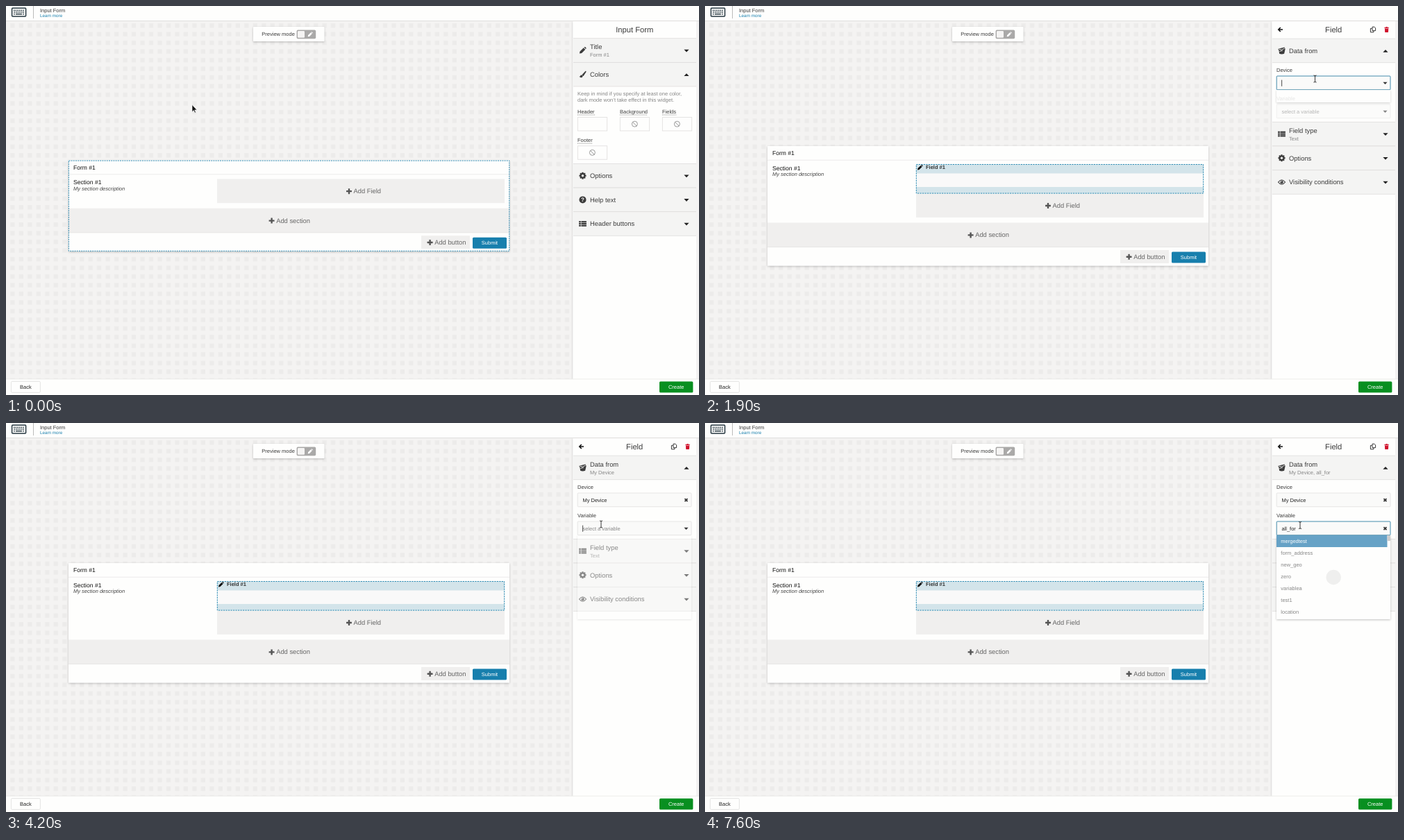
Animation of 998 by 561 pixels, one loop 8 s. Source, as an HTML page:

```html
<!DOCTYPE html>
<html lang="en">
<head>
<meta charset="utf-8">
<title>Form builder</title>
<style>
  html, body { margin: 0; width: 100%; height: 100%; overflow: hidden; background: #fefefd; }
  svg { display: block; width: 100vw; height: 100vh; }
  text { font-family: "Liberation Sans", Arial, sans-serif; text-rendering: geometricPrecision; white-space: pre; }
</style>
</head>
<body>
<svg id="stage" viewBox="0 0 998 561"></svg>
<script>
const INK = '#3c3c3c', GREY = '#868686', LINE = '#dedddc', BLUE = '#177fad', WHITE = '#fefefd', PALE = '#f0efee';

const text = (x, y, s, size = 7.5, fill = INK, extra = '') =>
  `<text x="${x}" y="${y}" font-size="${size}" fill="${fill}" ${extra}>${s}</text>`;
const rect = (x, y, w, h, fill, extra = '') =>
  `<rect x="${x}" y="${y}" width="${w}" height="${h}" fill="${fill}" ${extra}/>`;
const path = (d, fill, extra = '') => `<path d="${d}" fill="${fill}" ${extra}/>`;
const stroke = (d, color, w = 1, extra = '') =>
  path(d, 'none', `stroke="${color}" stroke-width="${w}" ${extra}`);
const group = (id, body, extra = '') => `<g id="${id}" ${extra}>${body}</g>`;
const put = (x, y, body, k = 1) => `<g transform="translate(${x} ${y}) scale(${k})">${body}</g>`;
const hline = (x, y, w, color = LINE) => rect(x, y - .4, w, .8, color);
const MID = 'text-anchor="middle"';

// Icons, each drawn around its own centre
const icon = {
  plus: c => rect(-4, -1.2, 8, 2.4, c, 'rx=".4"') + rect(-1.2, -4, 2.4, 8, c, 'rx=".4"'),
  pencil: c => path('M-4.6 4.6L-4 1.4L1.3-3.8L3.8-1.3L-1.4 4Z M2-4.4L2.7-5Q3.3-5.3 3.9-4.8L4.9-3.8Q5.3-3.2 4.9-2.6L4.3-2Z', c),
  brush: c => path('M-.9 .3L3.8-4.8Q5.2-5.3 5-3.8L1.3 2Q.7 2.6 0 2.1Z', c) + path('M-5 3Q-3.6 3-3.3 1.8Q-2.6.4-1.2.9Q.4 1.7 0 3Q-1.6 6-5 3Z', c),
  gear: c => [0, 45, 90, 135].map(a => rect(-1.2, -5, 2.4, 10, c, `rx=".5" transform="rotate(${a})"`)).join('') +
    `<circle r="2.8" fill="none" stroke="${c}" stroke-width="2"/><circle r="1.7" fill="#f4f4f3"/>`,
  help: c => `<circle r="5" fill="${c}"/>` + text(0, 2.9, '?', 8, '#fff', `font-weight="700" ${MID}`),
  list: c => [-3.9, -1.1, 1.7].map(y => rect(-5.4, y, 2.7, 2.2, c) + rect(-2, y, 7.4, 2.2, c)).join(''),
  data: c => path('M-4.8-2.6L4-4.8Q5.6-3 4.6 0L3.6 4.4Q0 5.8-3.4 4.4L-4-.4Q-5.6-1-4.8-2.6Z', c) +
    stroke('M-4-2.1Q0 .2 4.2-3.4M-3 1L1.4-.2', '#f4f4f3', .9),
  eye: c => stroke('M-5 0Q0-6.6 5 0Q0 6.6-5 0Z', c, 1.1) + `<circle r="2.2" fill="${c}"/><circle cx="-.7" cy="-.8" r=".7" fill="#fff"/>`,
  ban: c => `<circle r="4" fill="none" stroke="${c}"/>` + stroke('M-2.8-2.8L2.8 2.8', c),
  copy: c => stroke('M-1-3.8H2L3.6-2.2V1.6H-1ZM-1.4-1.6H-3.6V3.8H.9V2', c, .9),
  trash: c => rect(-3.2, -3.2, 6.4, 1.1, c) + rect(-1.2, -4, 2.4, 1, c) + path('M-2.7-1.6H2.7L2.3 4H-2.3Z', c),
  back: c => stroke('M3.4 0H-2.4M.2-3L-2.8 0L.2 3', c, 1.6),
  cross: c => stroke('M-2-2L2 2M2-2L-2 2', c, 1.7),
  down: c => path('M-3.6-1.7H3.6L0 2.1Z', c),
  up: c => path('M-3.6 1.9H3.6L0-1.9Z', c),
  keyboard: c => rect(-10, -6, 20, 12, 'none', `rx="1" stroke="${c}" stroke-width="1.5"`) +
    [-3.4, -.9].map((y, r) => [0, 1, 2, 3, 4, 5].map(i => rect(-7.6 + i * 2.6 + r * .4, y, 1.6, 1.5, c)).join('')).join('') +
    rect(-7.4, 1.9, 1.6, 1.5, c) + rect(-4.6, 1.9, 9, 1.5, c) + rect(5.6, 1.9, 1.6, 1.5, c),
};
const draw = (name, x, y, color = INK, k = 1) => put(x, y, icon[name](color), k);

function panelHead(cy, name, title, sub = '', open = false, id = '') {
  const y = sub ? cy - 1.6 : cy + 3.4;
  return rect(817, cy - 17.3, 177, 34.6, '#f4f4f3') + hline(817, cy - 17.3, 177) + hline(817, cy + 17.3, 177) +
    draw(name, 830.5, cy) + text(841, y, title, 9.4, INK, id && `id="${id}"`) +
    (sub && text(841, cy + 9.4, sub, 7.5, GREY)) + draw(open ? 'up' : 'down', 980, cy + .4, '#222');
}

const swatch = (x, y, label, w, empty) =>
  text(x, y, label) + stroke(`M${x} ${y + 2}H${x + w}`, '#555', .7, 'stroke-dasharray="1 1"') +
  rect(x + .3, y + 5.6, 42.4, 19.4, WHITE, `stroke="${LINE}" stroke-width=".8"`) +
  (empty ? '' : draw('ban', x + 21.4, y + 15.2, '#999'));

const addBox = (x, y, w, h, label, plusX, id = '') =>
  rect(x, y, w, h, PALE, id && `id="${id}"`) + draw('plus', plusX, y + h / 2 + .3, '#555') +
  text(plusX + 6.6, y + h / 2 + 3.2, label, 9.35, '#666');

function form(top, extra, selected) {
  const low = top + extra;
  return rect(90, top, 635, 131 + extra, WHITE, 'filter="url(#soft)"') +
    text(97, top + 13.2, 'Form #1', 8.55, '#111') + hline(90, top + 20.2, 635, '#e8e7e6') +
    text(97, top + 34.6, 'Section #1', 8.55, '#111') +
    text(97, top + 43.2, 'My section description', 7.5, '#444', 'font-style="italic"') +
    addBox(304, low + 26.8, 414, 34.7, 'Add Field', 494, selected ? 'addField' : '') +
    addBox(90, low + 69, 635, 35.2, 'Add section', 382.6) + hline(90, low + 104.2, 635, '#e4e3e2') +
    addBox(598, low + 108.5, 70, 19, 'Add button', 610.6) +
    rect(672, low + 111, 49, 16, BLUE, 'rx="1.5"') +
    text(696.5, low + 121.7, 'Submit', 7.5, '#fff', MID) +
    (selected ? rect(90.4, top + .4, 634.4, 130.2, 'none', `stroke="${BLUE}" stroke-width=".9" stroke-dasharray="2 1.2"`) : '');
}

const field = rect(304, 228.4, 414, 41.8, '#d3e4ea', 'id="field"') + rect(304.5, 241.4, 413, 19.6, '#f9f9f9') +
  rect(304.3, 228.5, 413.4, 41.6, 'none', `stroke="${BLUE}" stroke-width=".9" stroke-dasharray="2.2 1.3"`) +
  draw('pencil', 309.6, 233, '#111', .78) + text(318, 235.4, 'Field #1', 7.5, '#333', 'font-weight="700"');

const input = (id, y) => rect(823.2, y, 163.8, 19.8, '#fafaf9', `id="${id}Box" rx="1" stroke-width=".9"`) +
  text(830.4, y + 12.6, '', 7.5, '#222', `id="${id}Text"`) +
  group(id + 'Open', draw('down', 979.5, y + 10.2, '#333', .85)) + group(id + 'Clear', draw('cross', 979.5, y + 10.2, '#333')) +
  rect(830.3, y + 5.6, .8, 9.2, '#222', `id="${id}Caret"`);

const listBox = (y, h) => rect(823, y, 164, h, WHITE, 'filter="url(#soft)"');
const rows = (id, y, names, thumb) => group(id,
  rect(823, y, thumb ? 159.5 : 164, 17, '#1874ab') +
  names.map((n, i) => text(829.3, y + 11.1 + i * 17, n, 7.5, i ? '#4a4a4a' : '#fff')).join('') +
  (thumb ? rect(982.5, y, 4.5, thumb, '#b4b4b4') : ''));

const devices = ['2drones', 'Benchmarking Device', 'Big truck', 'KQT Lantern 2', 'KQT Pebble Pro', 'KQT Brisk', 'drones'];
const variables = ['mergedtest', 'form_address', 'new_geo', 'zero', 'variablea', 'test1', 'location'];

const startPanel = text(905.2, 37.7, 'Input Form', 11.2, INK, MID) +
  panelHead(64, 'pencil', 'Title', 'Form #1') + panelHead(98.7, 'brush', 'Colors', '', true) +
  text(823, 129.4, 'Keep in mind if you specify at least one color,', 7.5, GREY) +
  text(823, 137.6, 'dark mode won’t take effect in this widget.', 7.5, GREY) +
  swatch(823, 155, 'Header', 25, true) + swatch(884, 155, 'Background', 40) +
  swatch(945, 155, 'Fields', 20.5) + swatch(823, 196.2, 'Footer', 22) +
  panelHead(244.7, 'gear', 'Options') + panelHead(279.4, 'help', 'Help text') + panelHead(314, 'list', 'Header buttons');

const fieldPanel = text(905.2, 37.7, 'Field', 11.2, INK, MID) +
  draw('back', 828.6, 34, '#111') + draw('copy', 962, 34, '#222') + draw('trash', 981.6, 34, '#d0112b') +
  panelHead(64.4, 'data', 'Data from', '', true, 'dataTitle') + text(841, 73.6, '', 7.5, GREY, 'id="dataSub"') +
  text(823, 94.6, 'Device') + input('device', 101) +
  group('variableGroup', text(823, 135.8, 'Variable') + input('variable', 142)) +
  panelHead(184.6, 'list', 'Field type', 'Text') + panelHead(219.3, 'gear', 'Options') +
  panelHead(254, 'eye', 'Visibility conditions') +
  group('shortList', listBox(121, 18)) + rows('match', 121, ['My Device']) +
  group('deviceList', listBox(121, 120)) + rows('deviceRows', 121, devices, 51) +
  group('variableList', listBox(162, 121)) + rows('variableRows', 162, variables, 8) +
  '<circle id="spinner" cx="905.2" fill="#999"/>';

const cursors =
  group('arrow', path('M0 0V10.2L2.3 8L3.9 11.6L5.4 10.9L3.8 7.4H7Z', '#111', 'stroke="#fff" stroke-width=".6"')) +
  group('hand', path('M0 .5Q1-.6 1.9.6V4L6 5Q7 5.4 6.8 6.6L6.2 9V11H1V9.6L-2 6.4Q-2.4 5-.9 5.4L0 6.2Z', '#fff', 'stroke="#222" stroke-width=".9"')) +
  group('beam', stroke('M-2-5Q0-5 0-4Q0-5 2-5M0-4.4V4.4M-2 5Q0 5 0 4Q0 5 2 5', '#222', .9));

document.getElementById('stage').innerHTML = `<defs>
  <filter id="soft" x="-10%" y="-15%" width="120%" height="130%"><feDropShadow dx="0" dy="1" stdDeviation="1.6" flood-opacity=".24"/></filter>
  <pattern id="grid" width="12.48" height="12.48" y="22" patternUnits="userSpaceOnUse">
    ${rect(0, 0, 12.48, 12.48, '#f4f3f2')}${rect(6.24, 3.1, 6.24, 6.24, '#ecebea')}</pattern></defs>` +
  rect(0, 0, 998, 561, 'url(#grid)') +
  rect(356, 30, 102.3, 21, WHITE, 'rx="1" filter="url(#soft)"') + text(368.3, 43.3, 'Preview mode') +
  rect(418.6, 34.6, 27.6, 12.6, '#aaa9a8', 'rx="1.8"') + rect(420, 36, 10, 9.8, '#f5f4f3', 'rx="1.2"') +
  draw('pencil', 438, 41, '#fff', .72) +
  group('startForm', form(222.7, 0, true)) + group('fieldForm', form(202, 42 - .5, false) + field) +
  rect(816.4, 22, 177.8, 516, WHITE, 'filter="url(#soft)"') + rect(994.2, 22, 3.8, 516, '#f4f3f3') +
  group('startPanel', startPanel) + group('fieldPanel', fieldPanel) +
  rect(0, 0, 998, 21.5, WHITE) + hline(0, 21.6, 998, '#dad9d8') +
  draw('keyboard', 18.6, 9, '#25363f') + rect(39, 0, .8, 18, '#aaa') +
  text(49, 8.7, 'Input Form') + text(49, 15.8, 'Learn more', 6.3, BLUE) +
  rect(0, 538, 998, 23, WHITE) + hline(0, 538, 998, '#e6e5e4') +
  rect(7.4, 541.4, 42, 16, WHITE, `rx="1.5" stroke="${LINE}" stroke-width=".8"`) + text(28.3, 552.1, 'Back', 7.5, '#222', MID) +
  rect(941, 541.4, 48.4, 16.2, '#088f20', 'rx="1.5"') + text(965.2, 552.1, 'Create', 7.5, '#fff', MID) +
  cursors;

// Step tables: [time, value...], each value holds until the next row
const steps = {
  cursor: [[0, 268, 142.5, 'arrow'], [100, 279, 150, 'arrow'], [200, 325, 183, 'arrow'], [300, 396, 228, 'arrow'],
    [400, 442, 250, 'hand'], [500, 455, 255.5, 'hand'], [900, 482, 247, 'hand'], [1000, 590, 207, 'arrow'],
    [1100, 730, 151, 'arrow'], [1200, 832, 116, 'arrow'], [1300, 870, 107, 'beam'], [1400, 878.5, 105, 'beam'],
    [3200, 876, 110, 'beam'], [3300, 866, 123, 'hand'], [3400, 859, 128, 'hand'], [3700, 859, 128, 'arrow'],
    [4000, 858, 138, 'beam'], [4100, 857, 145, 'beam'], [4200, 857, 146, 'beam'], [4300, 857, 147.5, 'beam']],
  hover: [[0, '#d3e4ea'], [800, '#bcd6e1'], [1000, '#c8dde6'], [1100, '#d3e4ea']],
  addField: [[0, PALE], [400, '#ebeae9'], [500, '#e8e7e6']],
  device: [[0, ''], [2300, 'M'], [2400, 'My'], [2500, 'My D'], [2600, 'My Dev'], [2700, 'My Device']],
  deviceCaret: [[0, 0], [1900, 1], [2300, 0]],
  deviceFocus: [[0, 0], [1900, 1], [3700, 0]],
  shortList: [[0, 0], [1900, .8], [2000, 0], [3200, 1], [3600, .5], [3700, 0]],
  match: [[0, 0], [3200, 1], [3600, .5], [3700, 0]],
  deviceList: [[0, 0], [2000, 1], [3200, 0]],
  deviceRows: [[0, 0], [2000, .6], [2100, 1], [2300, .66], [3200, 0]],
  picked: [[0, 0], [3600, 1]],
  variable: [[0, ''], [5800, 'a'], [6000, 'al'], [6200, 'all'], [6400, 'all_'], [6900, 'all_f'], [7100, 'all_fo'], [7300, 'all_for']],
  variableCaret: [[0, 0], [4100, 1], [4700, 0], [5400, 1], [5900, 0]],
  variableFocus: [[0, 0], [4300, 1]],
  variableList: [[0, 0], [4200, .4], [4300, .8], [4400, 1]],
  variableRows: [[0, 0], [4700, .6], [4800, 1], [5800, .66]],
};
const spins = [{ from: 2400, to: 3200, y: 181.3 }, { from: 5840, to: 8000, y: 222.5 }];

const $ = id => document.getElementById(id);
const at = (name, t) => steps[name].findLast(row => row[0] <= t).slice(1);
const show = (id, alpha) => $(id).setAttribute('opacity', +alpha);
const set = (id, key, value) => $(id).setAttribute(key, value);
const ease = p => p * p * (3 - 2 * p);

function fillInput(id, value, hint, focus, caret) {
  const label = $(id + 'Text');
  label.textContent = value || hint;
  set(id + 'Text', 'fill', value ? '#222' : GREY);
  set(id + 'Box', 'stroke', focus ? '#2e7ea3' : '#e4e3e2');
  show(id + 'Open', !value);
  show(id + 'Clear', !!value);
  show(id + 'Caret', caret);
  set(id + 'Caret', 'x', 830.3 + (value ? label.getComputedTextLength() : 0));
}

function render(t) {
  const edited = t >= 800;
  for (const part of ['Form', 'Panel']) {
    show('start' + part, !edited);
    show('field' + part, edited);
  }
  set('field', 'fill', at('hover', t)[0]);
  set('addField', 'fill', at('addField', t)[0]);
  for (const id of ['shortList', 'match', 'deviceList', 'deviceRows', 'variableList', 'variableRows']) show(id, at(id, t)[0]);

  const [picked] = at('picked', t), [device] = at('device', t), [variable] = at('variable', t);
  fillInput('device', device, '', at('deviceFocus', t)[0], at('deviceCaret', t)[0]);
  fillInput('variable', variable, 'select a variable', at('variableFocus', t)[0], at('variableCaret', t)[0]);
  show('variableGroup', picked ? 1 : .6);
  set('dataTitle', 'y', picked ? 62.6 : 67.8);
  $('dataSub').textContent = picked ? 'My Device' + (variable && ', ' + variable) : '';

  const spin = spins.find(s => t >= s.from && t < s.to);
  show('spinner', 0);
  if (spin) {
    const p = ease((Math.min(t, 7600) - spin.from) % 1000 / 1000);
    set('spinner', 'cy', spin.y);
    set('spinner', 'r', 12.5 * p);
    show('spinner', 1 - p);
  }

  const [x, y, kind] = at('cursor', t);
  for (const id of ['arrow', 'hand', 'beam']) {
    show(id, id === kind);
    set(id, 'transform', `translate(${x} ${y})`);
  }
}

const start = performance.now();
function frame() {
  const t = (performance.now() - start) % 8000;
  render(Math.floor(t / 100) * 100);
  requestAnimationFrame(frame);
}
frame();
</script>
</body>
</html>
```
